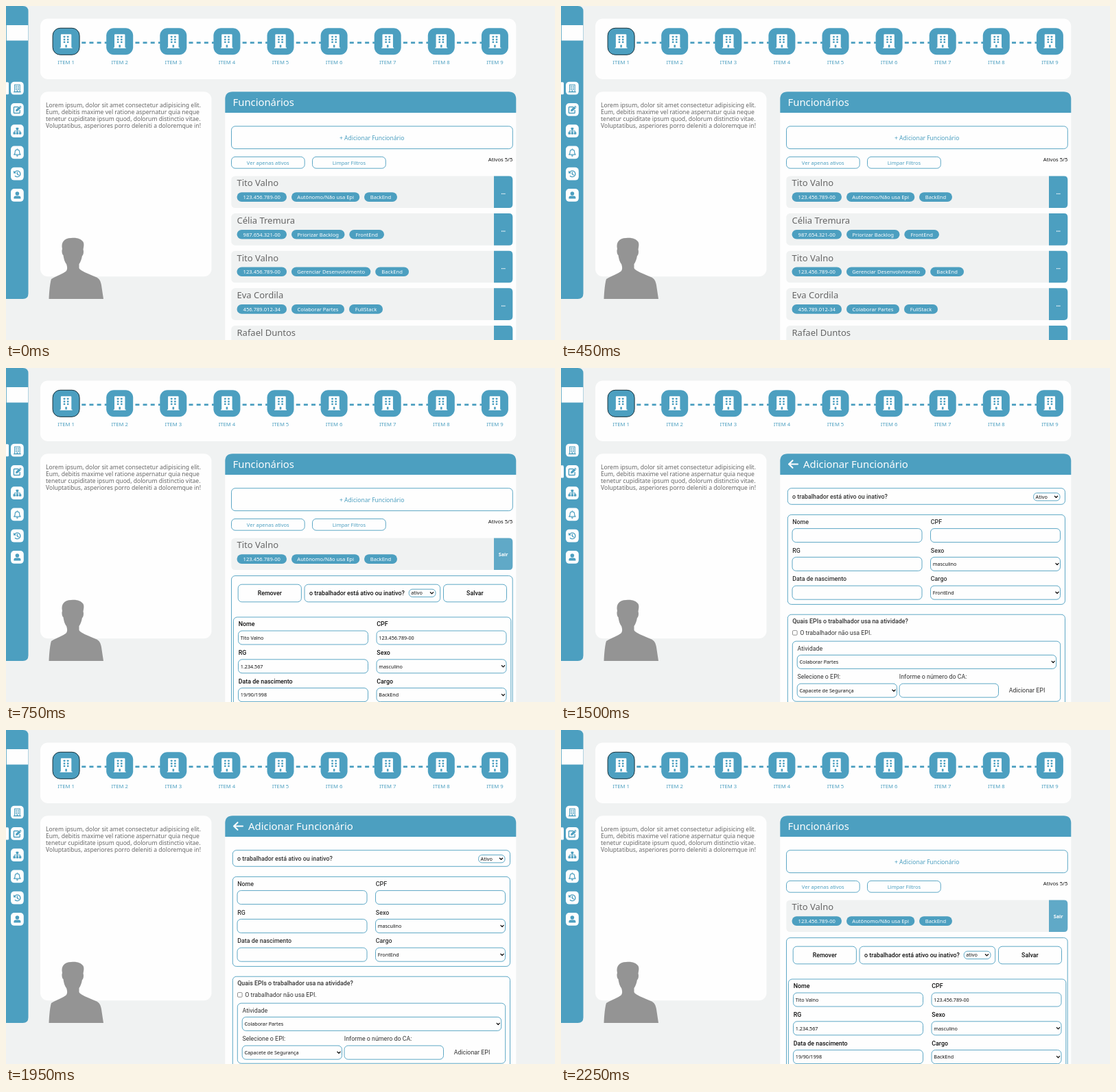
Animation of 800 by 488 pixels, one loop 3000 ms. Source, as an HTML page:

```html
<!DOCTYPE html>
<html lang="pt">
<head>
<meta charset="utf-8">
<title>Funcionários</title>
<style>
  html, body { margin: 0; width: 100%; height: 100%; overflow: hidden; background: #f0f2f2; }
  svg { display: block; width: 800px; height: 488px; font-family: "Noto Sans", "Open Sans", sans-serif; }
  .rb { font-family: Roboto, sans-serif; }
  .view { animation: 3s step-end infinite; }
  #list { animation-name: list; }
  #detail { animation-name: detail; }
  #add { animation-name: add; }
  #home { animation-name: home; }
  #mark { animation-name: mark; }
  @keyframes list { 0% { visibility: visible; } 25%, 100% { visibility: hidden; } }
  @keyframes detail { 0%, 50% { visibility: hidden; } 25%, 75%, 100% { visibility: visible; } }
  @keyframes add { 0%, 75%, 100% { visibility: hidden; } 50% { visibility: visible; } }
  @keyframes home { 0%, 75%, 100% { visibility: visible; } 50% { visibility: hidden; } }
  @keyframes mark { 0% { transform: none; } 50%, 100% { transform: translateY(31.3px); } }
</style>
</head>
<body>
<svg id="stage" viewBox="0 0 800 488" xmlns="http://www.w3.org/2000/svg"></svg>
<script>
const BLUE = '#4c9fc0', GREY = '#f0f2f2', INK = '#666', WHITE = '#fefefe';

const rect = (x, y, w, h, r, fill, extra = '') =>
  `<rect x="${x}" y="${y}" width="${w}" height="${h}" rx="${r}" fill="${fill}" ${extra}/>`;
const frame = (x, y, x2, y2, r = 5.5) =>
  rect(x, y, x2 - x, y2 - y, r, WHITE, `stroke="${BLUE}" stroke-width=".9"`);
const text = (s, x, y, size, fill = INK, extra = '') =>
  `<text x="${x}" y="${y}" font-size="${size}" fill="${fill}" ${extra}>${s}</text>`;
const mid = 'text-anchor="middle"';
const label = (s, x, y, fill = '#333', weight = 500, extra = '') =>
  text(s, x, y, 8.85, fill, `class="rb" font-weight="${weight}" ${extra}`);
const path = (d, fill, extra = '') => `<path d="${d}" fill="${fill}" ${extra}/>`;
const line = (d, color, width) =>
  path(d, 'none', `stroke="${color}" stroke-width="${width}" stroke-linecap="round" stroke-linejoin="round"`);
const group = (id, body) => `<g id="${id}" class="view">${body}</g>`;
const range = (n, fn) => Array.from({ length: n }, (_, i) => fn(i)).join('');

function field(x, y, x2, value = '', select = false) {
  return frame(x, y, x2, y + 20) + text(value, x + 3.3, y + 12.8, 7.2, '#111') +
    (select ? chevron(x2 - 4.5, y + 10) : '');
}
const chevron = (x, y) => line(`M${x - 2.1} ${y - 1}l2.1 2.1 2.1-2.1`, '#111', 1.3);

function miniSelect(x, y, x2, value) {
  return frame(x, y, x2, y + 11.3, 5) + text(value, x + 3, y + 8.2, 7.3, '#111') + chevron(x2 - 5.5, y + 5.6);
}

// Office block icon, 448 x 512 units
const tower =
  path('M12 480h20V24Q32 0 56 0H392Q416 0 416 24V480h20q12 0 12 12v20H0v-20q0-12 12-12z', WHITE) +
  range(6, i => rect(128 + (i % 2) * 128, 64 + (i >> 1) * 96, 64, 64, 12, BLUE)) +
  rect(192, 384, 64, 96, 10, BLUE);

function step(i) {
  const x = 87.6 + i * 78.1;
  return rect(x - 19.5, 32.3, 39, 39, 11, BLUE, i ? '' : 'stroke="#17303a" stroke-width="1"') +
    `<g transform="translate(${x - 9} 41.2) scale(.0402)">${tower}</g>` +
    text(`ITEM ${i + 1}`, x, 84.5, 7.7, BLUE, `${mid} font-weight="500"`);
}

// Sidebar icons, drawn around their own centre
const icons = [
  line('M-3.8-5.2H3.8V5.2H-3.8zM-5 5.4H5', BLUE, 1.1) +
    range(6, i => rect(-2.3 + (i % 2) * 2.8, -3.6 + (i >> 1) * 2.2, 1.7, 1.4, .2, BLUE)) +
    rect(-.8, 3, 1.6, 2.3, 0, BLUE),
  line('M1-4H-4.2Q-5-4-5-3.2V4.2Q-5 5-4.2 5H3Q3.8 5 3.8 4.2V1', BLUE, 1.4) +
    path('M-2.3 2.6L-2 .1 2.8-4.7 5.2-2.3.4 2.4zM3.3-5.2Q4.2-6 5-5.2L5.7-4.5Q6.4-3.7 5.6-2.8z', BLUE),
  line('M0-2V2M-4.2 2V0H4.2V2', BLUE, 1) + rect(-1.8, -5, 3.6, 3.4, .6, BLUE) +
    [-5.9, -1.7, 2.5].map(x => rect(x, 1.6, 3.4, 3.3, .6, BLUE)).join(''),
  line('M-4.7 3.2Q-3.2 1.8-3.2-.8C-3.2-5.2 3.2-5.2 3.2-.8Q3.2 1.8 4.7 3.2zM0-5.2V-4.4', BLUE, 1.2) +
    path('M-1.6 4.4H1.6Q1.3 6 0 6T-1.6 4.4z', BLUE),
  line('M-3.6-2.4A4.4 4.4 0 1 1-3 3.2M0-2.2V.4L1.8 1.6', BLUE, 1.4) + path('M-5.4-4.8V-.8H-1.4z', BLUE),
  `<circle cy="-2.5" r="2.8" fill="${BLUE}"/>` + path('M-5 5V3.6Q-5 1.1-2.4 1.1H2.4Q5 1.1 5 3.6V5z', BLUE)
];

const sidebar =
  path('M0 0H24.5Q32.5 0 32.5 8V420Q32.5 428 24.5 428H0z', BLUE) +
  rect(.8, 28, 31.4, 22.5, 0, WHITE) +
  icons.map((icon, i) => `<g transform="translate(16.4 ${120.2 + i * 31.25})">` +
    rect(-9.4, -9.4, 18.8, 18.8, 5, WHITE) + icon + '</g>').join('') +
  group('mark', rect(-3, 111.2, 7, 18, 1.5, WHITE));

const top_ = rect(50, 18.5, 693.3, 88.5, 11, WHITE) +
  `<path d="M88 53.7H712" stroke="${BLUE}" stroke-width="2.8" stroke-dasharray="6 5.157"/>` + range(9, step);

const about = [
  'Lorem ipsum, dolor sit amet consectetur adipisicing elit.',
  'Eum, debitis maxime vel ratione aspernatur quia neque',
  'tenetur cupiditate ipsum quod, dolorum distinctio vitae.',
  'Voluptatibus, asperiores porro deleniti a doloremque in!'
];
const aside = rect(50, 125.2, 249.5, 270, 11, WHITE) +
  about.map((s, i) => text(s, 58, 148.2 + i * 10, 8.6)).join('') +
  path('M62.5 428C63 418 64 405 66 399C72 395 84 391 88 387C90 384 89 380 88 377C86 375 84 369 83.5 364' +
    'C81.5 363 81 357 82 355C80 346 84 339 95 339C104 338 109 341 111 343C115 346 113 352 112.5 356' +
    'C113.5 358 113 364 111 365C110 371 108 375 106.5 377V383C108 387 120 391 131 396C136 398 138 402 139 408L142 428z',
    '#949494');

const panel = path('M319.3 488V136Q319.3 125.2 330.3 125.2H732.3Q743.3 125.2 743.3 136V488z', WHITE) +
  path('M319.3 156V136.2Q319.3 125.2 330.3 125.2H732.3Q743.3 125.2 743.3 136.2V156z', BLUE);

const home = text('Funcionários', 330.6, 146.4, 14.8, WHITE) +
  frame(328.5, 175.7, 738.3, 208.6) + text('+ Adicionar Funcionário', 533.2, 195.8, 8.5, BLUE, mid) +
  frame(328.5, 220.4, 435.2, 237.2) + text('Ver apenas ativos', 381.8, 231.7, 7.5, BLUE, mid) +
  frame(446.5, 220.4, 553.3, 237.2) + text('Limpar Filtros', 500, 231.7, 7.5, BLUE, mid) +
  text('Ativos 5/5', 738.4, 227.3, 7.7, '#111', 'text-anchor="end"');

// Each tag: caption, left and right edge
const people = [
  ['Tito Valno', ['123.456.789-00', 336.5, 409], ['Autônomo/Não usa Epi', 416, 515.3], ['BackEnd', 522, 570]],
  ['Célia Tremura', ['987.654.321-00', 336.5, 409], ['Priorizar Backlog', 416, 493.5], ['FrontEnd', 500.3, 551]],
  ['Tito Valno', ['123.456.789-00', 336.5, 409], ['Gerenciar Desenvolvimento', 416, 531.3], ['BackEnd', 538.2, 587]],
  ['Eva Cordila', ['456.789.012-34', 336.5, 409], ['Colaborar Partes', 416, 493], ['FullStack', 500, 549]],
  ['Rafael Duntos']
];
function row([name, ...tags], i, open) {
  const y = 248.5 + i * 54.6;
  return rect(328.3, y, 410, 46.6, 5.5, GREY) +
    path(`M711 ${y}H733q5.3 0 5.3 5.3V${y + 41.3}q0 5.3-5.3 5.3H711z`, open ? '#60a9c7' : BLUE) +
    (open ? text('Sair', 724.7, y + 26, 7.2, WHITE, `${mid} font-weight="700"`)
      : range(3, k => rect(721.9 + k * 2.1, y + 25.2, 1.4, 1.4, .4, WHITE))) +
    text(name, 336.5, y + 14.8, 13) +
    tags.map(([s, a, b]) => rect(a, y + 23.8, b - a, 13.6, 6.8, BLUE) +
      text(s, (a + b) / 2, y + 33.4, 7.6, WHITE, mid)).join('');
}

// Two-column personal data form
function form(x, y, color, values) {
  const names = ['Nome', 'CPF', 'RG', 'Sexo', 'Data de nascimento', 'Cargo'];
  return names.map((s, i) => {
    const left = x + (i % 2) * 201.5, top = y + (i >> 1) * 41.8;
    return label(s, left + .3, top - 6.8, color) + field(left, top, left + 189, values[i], i === 3 || i === 5);
  }).join('');
}

const detail = row(people[0], 0, true) +
  frame(328.5, 303.6, 738.2, 520) +
  frame(338.2, 316.2, 430.4, 341.8) + label('Remover', 384.2, 332, '#111', 500, mid) +
  frame(435, 316.2, 632.7, 341.8) + label('o trabalhador está ativo ou inativo?', 442, 331.8, '#111') +
  miniSelect(587.2, 323.2, 626, 'ativo') +
  frame(637.5, 316.2, 729.5, 341.8) + label('Salvar', 683.4, 332, '#111', 500, mid) +
  frame(331.4, 364, 735.8, 520) +
  form(338.5, 384, '#111', ['Tito Valno', '123.456.789-00', '1.234.567', 'masculino', '19/90/1998', 'BackEnd']);

const add = line('M332 140.5H345M337.5 135.2L332 140.5L337.5 145.8', WHITE, 2.1) +
  text('Adicionar Funcionário', 353, 146.4, 14.9, WHITE) +
  frame(330.3, 175.7, 734.5, 199.3) + label('o trabalhador está ativo ou inativo?', 337, 191.2) +
  miniSelect(688.6, 182.6, 727, 'Ativo') +
  frame(330.3, 214.4, 734.5, 345.4) +
  form(337, 234.6, '#333', ['', '', '', 'masculino', '', 'FrontEnd']) +
  frame(330.3, 360.2, 734.5, 520) + label('Quais EPIs o trabalhador usa na atividade?', 337.2, 373.3) +
  rect(337.5, 383.6, 6.6, 6.6, 1.2, '#fff', 'stroke="#777" stroke-width=".8"') +
  label('O trabalhador não usa EPI.', 348.3, 390.2, '#333', 400) +
  frame(337.3, 399.2, 727.7, 487.2) +
  label('Atividade', 344.5, 412.8, '#333', 400) + field(344.2, 419.4, 721.7, 'Colaborar Partes', true) +
  label('Selecione o EPI:', 344.5, 454.3, '#333', 400) + field(344.2, 461.2, 489.5, 'Capacete de Segurança', true) +
  label('Informe o número do CA:', 492.8, 454.3, '#333', 400) + field(493, 461.2, 637.5) +
  label('Adicionar EPI', 652.7, 473.6, '#333', 400);

document.getElementById('stage').innerHTML =
  rect(0, 0, 800, 488, 0, GREY) + sidebar + top_ + aside + panel + group('home', home) +
  group('list', people.map((p, i) => row(p, i)).join('')) + group('detail', detail) + group('add', add);
</script>
</body>
</html>
```
